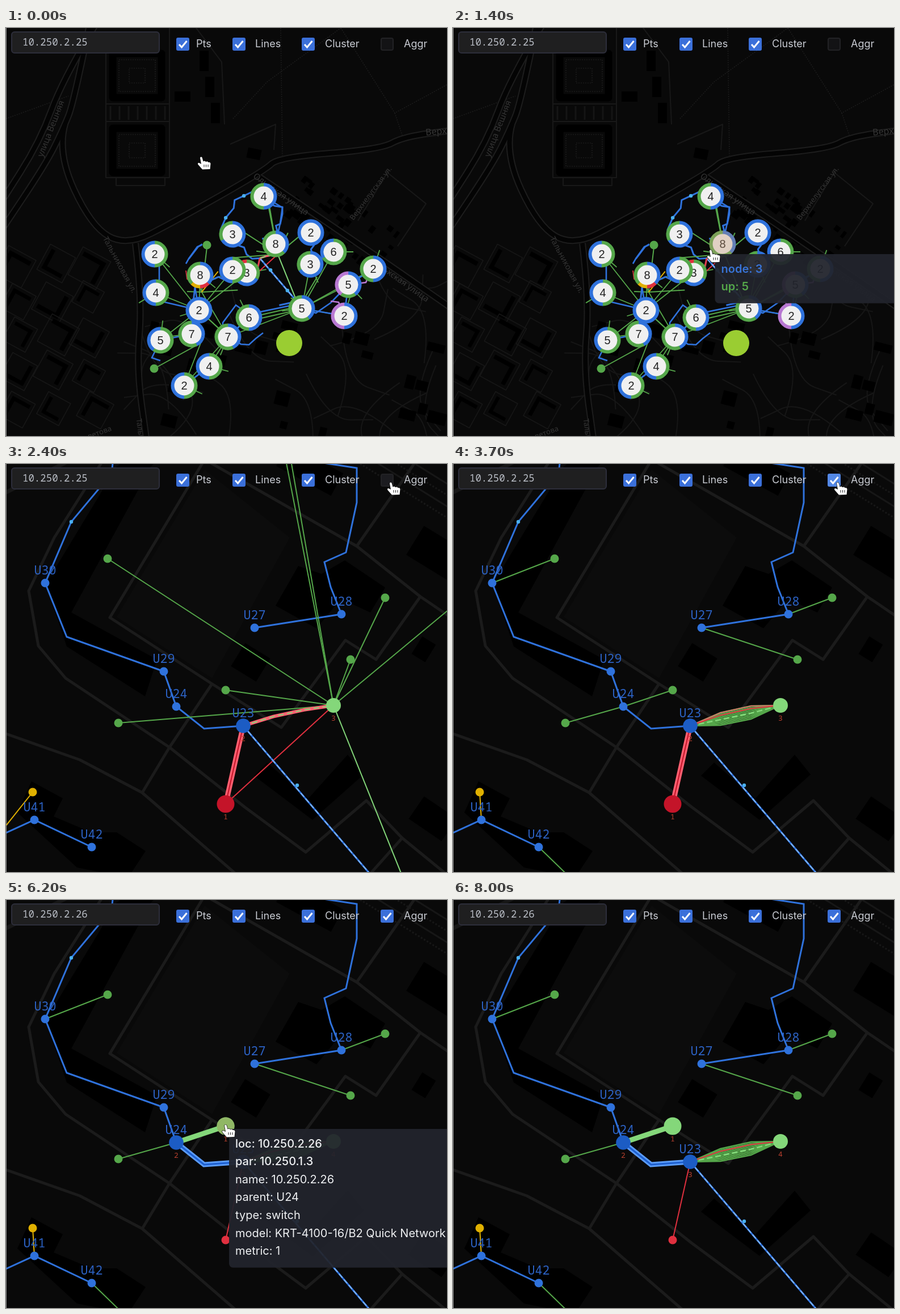
An HTML page with a canvas for the animation above (8.6 s loop, 777 by 720 pixels).

```html
<!DOCTYPE html>
<html lang="en">
<head>
<meta charset="utf-8">
<title>Network map</title>
<style>
html,body{margin:0;width:100%;height:100%;overflow:hidden;background:#090909}
canvas{display:block}
</style>
</head>
<body>
<canvas id="stage" width="777" height="720"></canvas>
<script>
const g = document.getElementById('stage').getContext('2d');
const LOOP = 8600, CX = 454.5, CY = 392.5, FULL = 5.04;
const SANS = 'Inter, "Open Sans", sans-serif';
const MONO = '"Noto Sans Mono", "DejaVu Sans Mono", monospace';
const INK = {b: '#2f72dc', g: '#55a74a', r: '#e0303f', y: '#e0b000', p: '#b878d2', l: '#84d77a'};

const pts = s => s.split(' ').map(p => p.split(',').map(Number));
const at = s => (x, y) => [CX + (x - CX) * s, CY + (y - CY) * s];
function trace(list, close) {
  g.beginPath();
  list.forEach(([x, y]) => g.lineTo(x, y));
  if (close) g.closePath();
}
// Rounds every inner corner of a polyline.
function curve(list) {
  g.beginPath(); g.moveTo(...list[0]);
  for (let i = 1; i < list.length - 1; i++) {
    const [x, y] = list[i], [u, v] = list[i + 1];
    g.quadraticCurveTo(x, y, (x + u) / 2, (y + v) / 2);
  }
  g.lineTo(...list.at(-1));
}
function stroke(list, color, width, dash = [], shape = trace) {
  shape(list);
  g.strokeStyle = color; g.lineWidth = width;
  g.setLineDash(dash); g.stroke(); g.setLineDash([]);
}
function disc(x, y, r, color) {
  g.beginPath(); g.arc(x, y, r, 0, 7); g.fillStyle = color; g.fill();
}
function text(s, x, y, font, color, align = 'left') {
  g.font = font; g.fillStyle = color; g.textAlign = align; g.fillText(s, x, y);
}
function box(x, y, w, h, r, fill, edge) {
  g.beginPath(); g.roundRect(x, y, w, h, r);
  g.fillStyle = fill; g.fill();
  if (edge) { g.strokeStyle = edge; g.lineWidth = 2; g.stroke(); }
}
function placed(x, y, turn, draw) {
  g.save(); g.translate(x, y); g.rotate(turn); draw(); g.restore();
}
function block(x, y, w, h, turn) {
  placed(x, y, turn, () => { g.fillStyle = '#000'; g.fillRect(-w / 2, -h / 2, w, h); });
}
function randomizer(seed) {
  return () => (seed = (seed * 16807) % 2147483647) / 2147483647;
}

// ---- base maps ----
const AVENUES = [
  '150,-20 120,130 100,180 70,240 -10,360', '166,-20 100,90 60,200 -10,310',
  '104,170 90,220 150,350 212,385 300,340 455,252 480,228 660,214 700,192 790,180',
  '228,380 240,480 230,600 248,730', '445,262 600,366 790,498'
].map(pts);
const LANES = ['176,36 176,264 288,264 288,0', '176,134 288,134', '176,165 288,165', '194,264 194,278 280,278 280,264',
  '335,0 380,60 385,170', '395,205 475,170 472,215', '675,250 620,340', '668,252 740,310 690,385'].map(pts);
const TRAILS = ['484,0 487,225', '400,160 460,95 590,0', '590,0 685,150 777,100', '685,150 700,195', '0,160 110,120'].map(pts);
const STREETS = [
  ['улица Вешняя', 80, 178, -1.2, 15], ['Тальниковая ул.', 200, 418, 1.08, 14], ['Верх', 758, 184, -.1, 16],
  ['Верхнелугская ул.', 643, 292, -.93, 13], ['Ольхская улица', 484, 294, .62, 15],
  ['Ольхская улица', 696, 447, .62, 15], ['Тальн', 236, 708, 1.45, 13], ['ветова', 165, 714, -.35, 13]
];
function courtyard(x, y, size, turn) {
  placed(x, y, turn, () => {
    const a = size, b = size * .38;
    const ell = [[-a, -a], [a, -a], [a, -a + b], [-a + b, -a + b], [-a + b, a], [-a, a]];
    trace(ell, true); g.fillStyle = '#000'; g.fill();
    g.strokeStyle = '#171717'; g.lineWidth = 1.5; g.strokeRect(-a - 6, -a - 6, 2 * a + 12, 2 * a + 12);
  });
}
function cityMap() {
  const rnd = randomizer(41), span = (a, b) => a + rnd() * (b - a);
  g.lineJoin = 'round';
  LANES.forEach(l => stroke(l, '#181818', 2));
  TRAILS.forEach(l => stroke(l, '#1c1c1c', 1.5, [2, 2]));
  for (let i = 0; i < 26; i++) {
    const x = span(240, 760), y = span(470, 720), a = span(0, 6);
    const leg = (d, turn) => [x + d * Math.cos(a + turn), y + d * Math.sin(a + turn)];
    stroke([leg(90, 0), [x, y], leg(80, 2)], '#161616', 2, [], curve);
  }
  for (let y = 420; y < 730; y += 62)
    for (let x = 20; x < 215; x += 66) courtyard(x + span(-8, 8), y + span(-8, 8), span(15, 22), .5 + 1.57 * Math.floor(span(0, 4)));
  for (let i = 0; i < 50; i++) {
    const u = span(0, 200), v = span(-75, 55);
    block(515 + u * .8 + v * .3, 285 + u * .55 - v * .6, span(6, 16), span(6, 13), .65);
  }
  for (let i = 0; i < 26; i++) block(span(250, 770), span(510, 720), span(12, 38), span(10, 26), .25);
  for (let i = 0; i < 3; i++) block(349 + i * 10, 58 + i * 46, 16, 36, 0);
  block(311, 121, 28, 18, 0); block(437, 222, 24, 18, .2);
  for (const y of [84, 216]) {
    g.strokeStyle = '#000'; g.lineWidth = 13; g.strokeRect(188, y - 39, 86, 78);
    g.setLineDash([2, 2]); g.strokeStyle = '#222'; g.lineWidth = 1.2;
    g.strokeRect(199, y - 28, 64, 56); g.strokeRect(217, y - 13, 28, 26); g.setLineDash([]);
  }
  for (let x = 184; x < 285; x += 16) stroke([[x, 138], [x, 162]], '#151515', 3);
  AVENUES.forEach(l => stroke(l, '#1d1d1d', 12, [], curve));
  AVENUES.forEach(l => stroke(l, '#040404', 8, [], curve));
  for (const [s, x, y, a, size] of STREETS)
    placed(x, y, a, () => text(s, 0, 4, size + 'px "Noto Sans", sans-serif', '#353535', 'center'));
}
const HALLS = ['70,212 195,5 330,-110 350,-90 255,5 115,262 266,345 245,410 107,322',
  '475,250 515,180 556,194 597,170 668,218 642,262 590,238 547,290', '437,550 460,527 533,590 602,513 630,548 540,628',
  '45,560 100,590 84,622 150,650 195,650 246,683 215,730 125,712 20,615'].map(pts);
const PATHS = ['-220,410 0,476 130,522 240,580 470,780', '240,580 288,500 363,388', '350,-8 183,271 363,388 485,465 598,311 652,345 730,234',
  '288,500 105,378 57,321 40,224 85,130 170,-5 320,-140', '288,500 420,605 528,685 635,594 698,660 820,760', '698,660 600,770',
  '350,-8 618,145 730,234 930,370', '618,145 705,20 760,-60'].map(pts);
function yardMap() {
  g.lineJoin = 'round';
  g.fillStyle = '#0c0c0c'; trace(pts('350,10 195,270 363,378 500,130'), true); g.fill();
  HALLS.forEach(h => { trace(h, true); g.fillStyle = '#000'; g.fill(); });
  block(431, 350, 52, 48, .55); block(757, 157, 85, 60, .55); block(736, 327, 28, 36, .55);
  block(752, 626, 70, 48, .6); block(535, 10, 110, 45, .5); block(-95, 350, 90, 75, .4);
  PATHS.forEach(p => stroke(p, '#1b1b1b', 5));
  for (let i = 0; i < 4; i++) {
    stroke([[-220, 160 - 60 * i], [350, -125 - 60 * i]], '#171717', 7);
    stroke([[400, -200 + 20 * i], [930, 130 + 20 * i]], '#171717', 3, i % 2 ? [3, 3] : []);
  }
}

// ---- network ----
// "name:x,y" marks a labelled node on its cable.
const NODES = {};
const CABLES = [
  'U27:438,289 U28:591,265 572,217 561,173 599,156 618,68 618,7 552,-3 U33:464,-42 U32:380,-143 276,-93 194,-55 186,17 115,102 U30:69,210 107,305 U29:278,366 U24:300,428 349,467 U23:418,462',
  'U34:839,192 880,226 U35:904,276 898,348 872,383 888,433', 'U25:864,563 927,521',
  '-176,873 U17:-158,723 U41:50,628 U42:151,676', 'U40:-93,337 -131,360 -212,466', 'U21:746,846 590,880'
].map(line => line.split(' ').map(token => {
  const [place, name] = token.split(':').reverse(), p = place.split(',').map(Number);
  if (name) NODES[name] = p;
  return p;
}));
const U = NODES, HUB = [577, 426], HUB2 = [-99, 763], RED = [387, 600], LEAF = [387, 399];
const BEND = [349, 467];
const LEAVES = `179,167,U30 198,457,U24 387,399,U24 607,345,U27 668,236,U28 471,-120,U32 492,-64,U33
-50,346,U40 -174,553,U17 222,745,U42 47,579,U41`.split(/\s/).map(s => {
  const [x, y, name] = s.split(',');
  return {p: [+x, +y], parent: U[name], hub: x < 100 || y > 700 ? HUB2 : HUB, ink: name == 'U41' ? INK.y : INK.g};
});
LEAVES[0].hub = LEAVES[1].hub = HUB;
LEAVES.slice(0, 7).forEach(l => l.hub = HUB);

const CLUSTERS = `454,297,bbgg 399,364,bbg 475,381,bbbggggg 537,361,bb 577,395,ggggbb 536,417,bbg 647,425,bg
603,453,bbgpp 596,508,bp 424,432,gbr 399,427,gb 342,436,bbbryggg 262,399,gb 264,467,ggbb 340,498,bb 428,511,bbbggg
521,495,bbggg 391,545,bbbgggg 327,540,bbbgggg 272,551,gggbb 358,597,ggbb 314,631,gb`.split(/\s/).map(s => {
  const [x, y, kinds] = s.split(',');
  return {x: +x, y: +y, kinds};
});
const LOOPS = ['345,383 337,386 322,407 317,416', '391,545 414,558 428,559 440,548 453,538', '382,530 382,520 405,489 428,505 520,486',
  '521,495 546,503 572,485 603,453', '272,551 257,582 272,587', '454,297 487,317 483,345 475,381',
  '270,410 270,452 272,482 340,498 333,458'].map(pts);
const HUBS = CLUSTERS.filter(c => [340, 391, 521].includes(c.x));
const gap = (a, b) => Math.hypot(a.x - b.x, a.y - b.y);
const nearest = (c, list) => list.filter(o => o != c).sort((a, b) => gap(a, c) - gap(b, c))[0];

function farLinks(W) {
  const rnd = randomizer(9);
  const draw = (l, color, w) => stroke(l.map(p => W(...p)), color, w);
  const wire = (a, b, color, w) => draw([[a.x, a.y], [b.x, b.y]], color, w);
  for (const c of CLUSTERS) {
    if (c.y < 390) continue;
    wire(c, nearest(c, HUBS), INK.g, 1.8);
    if (c.y > 500 || c.x > 500) wire(c, nearest(c, CLUSTERS), INK.b, 2.6);
    const a = rnd() * 6.3;
    wire(c, {x: c.x + 35 * Math.cos(a), y: c.y + 35 * Math.sin(a)}, INK.g, 1.8);
  }
  for (const dy of [0, 6]) draw([[428, 511 + dy], [521, 490 + dy]], INK.g, 1.8);
  draw(pts('261,601 343,556 314,631'), INK.g, 1.8);
  draw(pts('343,463 391,545'), INK.g, 1.8);
  draw(pts('319,465 345,466'), INK.g, 1.8);
  LOOPS.forEach(l => draw(l, INK.b, 2.6));
  draw(pts('317,428 319,443 334,451 333,458'), INK.r, 1.8);
  draw(pts('572,482 586,484 596,508'), INK.p, 2.6);
  draw(pts('603,453 634,449 638,440'), INK.p, 2.6);
}
function drawCluster(c, P, hot) {
  const [x, y] = P(c.x, c.y), step = Math.PI * 2 / c.kinds.length;
  disc(x, y, 18.5, '#f0f0f0');
  [...c.kinds].forEach((k, i) => {
    const a = i * step - Math.PI / 2;
    g.beginPath(); g.arc(x, y, 20.5, a, a + step + .01);
    g.strokeStyle = INK[k]; g.lineWidth = 6; g.stroke();
  });
  text(c.kinds.length, x, y + 7, '20px "Liberation Sans", sans-serif', '#222', 'center');
  if (hot) disc(x, y, 23.5, 'rgba(195,150,115,.36)');
}
function network(k, t, aggr, moved, hover) {
  const s = k / FULL, N = at(s), W = at(k), clustered = k < 2;
  const draw = (l, color, width, dash) => stroke(l.map(p => N(...p)), color, width, dash);
  const dot = (p, r, color) => disc(...N(...p), r, color);
  const font = 21.6 * s + 'px ' + MONO;
  const note = (str, [x, y], dy, f, color) => text(str, ...N(x, y + dy), f, color, 'center');

  if (clustered) farLinks(W);
  CABLES.forEach(l => draw(l, INK.b, 3));
  LEAVES.forEach(l => draw([l.p, aggr ? l.parent : l.hub], l.ink, 2));
  if (!aggr) {
    draw([RED, HUB], INK.r, 2);
    draw([HUB, U.U21], INK.l, 2);
    draw([HUB, [798, 242]], INK.g, 2);
    draw([[693, 815], U.U21], INK.g, 2);
    draw([[927, 628], [782, 873]], INK.g, 2);
  }
  draw([U.U23, U.U21], INK.b, 3.2);
  draw([U.U23, U.U21], '#7db4ff', 2, [9, 4]);

  const strand = (a, color, w, dash) =>
    draw([U.U23, [471, 439 + 22 * a], [525, 427 + 23 * a], HUB], color, w, dash);
  if (aggr) {
    for (let i = 0; i < 9; i++) strand(i / 8, INK.g, 2.4);
    if (!moved) strand(0, '#d07a68', 2);
    strand(.55, INK.l, 2.5, [10, 5]);
    strand(.2, INK.r, 2);
  } else {
    strand(.3, '#ff6272', clustered ? 3 : 6);
    strand(.3, INK.l, 2, [10, 6]);
  }
  if (moved) {
    const route = [U.U24, BEND, U.U23];
    draw([U.U23, RED], INK.r, 2);
    draw([LEAF, U.U24], INK.l, 9);
    draw(route, '#5a9bf8', 9); draw(route, '#1d5fd0', 3);
  } else {
    draw([U.U23, RED], '#ff5f70', clustered ? 3 : k < 4 ? 7 : 9);
    draw([U.U23, RED], '#c41429', clustered ? 1 : 2);
  }
  for (const p of [[115, 102], [276, -93], [513, 567], [663, 749]]) dot(p, 3.2, '#4ab0f0');

  if (clustered) {
    disc(...W(354, 383), 7.5, INK.g);
    disc(...W(261, 601), 7.5, INK.g);
    disc(...W(499, 556), 23, '#9acd32');
    CLUSTERS.forEach(c => drawCluster(c, W, c === hover));
    return;
  }
  LEAVES.forEach(l => dot(l.p, 7.5, l.ink));
  if (!aggr) [HUB2, [798, 242], [693, 815]].forEach(p => dot(p, 7.5, INK.g));
  for (const n in U) dot(U[n], 7.5, n == 'U24' && k < 5 ? '#5b74b0' : INK.b);
  const trail = moved ? [LEAF, U.U24, U.U23, HUB] : [RED, U.U23, HUB];
  dot(HUB, 13, INK.l);
  trail.slice(1, -1).forEach(p => dot(p, 12.8, '#1c5cc4'));
  if (moved) { dot(RED, 7.5, INK.r); dot(LEAF, 15.5, INK.l); }
  else dot(RED, 15.5, '#c41429');
  if (t >= 5900 && t < 6700) dot(LEAF, moved ? 15.5 : 7.5, '#90b765');
  trail.forEach((p, i) => note(i + 1, p, 26.5, 13 * s + 'px ' + MONO, '#b8402f'));
  for (const n in U) note(n, U[n], -15.5, font, '#2c62c4');
}

// ---- interface ----
function tooltip(x, y, rows) {
  box(x, y, 420, rows.length * 31.6 + 23.5, 7, 'rgba(33,36,44,.94)');
  rows.forEach(([s, color, weight], i) =>
    text(s, x + 11, y + 32.5 + i * 31.6, `${weight} 20px ${SANS}`, color));
}
const DETAILS = ['loc: 10.250.2.26', 'par: 10.250.1.3', 'name: 10.250.2.26', 'parent: U24', 'type: switch',
  'model: KRT-4100-16/B2 Quick Network', 'metric: 1'].map((s, i) => [s, '#eef0f2', i < 2 ? 500 : 400]);
function summary(kinds) {
  const count = c => kinds.split(c).length - 1;
  return [['node', 'b', '#3874d8'], ['up', 'g', INK.g], ['down', 'r', INK.r]]
    .filter(r => count(r[1])).map(([name, c, color]) => [`${name}: ${count(c)}`, color, 600]);
}
function toolbar(aggr, moved, x, y) {
  const over = x < 270 && y > 5 && y < 45, hot = x > 658 && x < 690 && y < 45;
  box(10, 7, 260, 37, 5, '#1f1f20', over ? '#444658' : '#2d2e3b');
  text(moved ? '10.250.2.26' : '10.250.2.25', 29, 30.5, '17.4px ' + MONO, '#b9bdc5');
  [[300, 335, 'Pts'], [399, 439, 'Lines'], [521, 562, 'Cluster'], [660, 701, 'Aggr']].forEach(([bx, tx, name], i) => {
    const lit = i == 3 && hot;
    if (i < 3 || aggr) {
      box(bx, 17, 23, 23, 3, lit ? '#5388e6' : '#3b70da');
      stroke([[bx + 5, 29], [bx + 9.5, 34], [bx + 18.5, 23]], '#fff', 3);
    } else box(bx + 1, 18, 21, 21, 3, lit ? '#1c1c20' : '#131315', '#222225');
    text(name, tx, 33.5, '18px ' + SANS, '#c9ccd3');
  });
}
const hand = new Path2D('M5 2Q6.5 -.5 8.5 1.5L10.5 8.5 13 7.5 15 9 18 8.5 19.5 10 22 10 23.5 12 22.5 22 9 22.5 1.5 14Q0 11 3 11L7 13Z');
function pointer(x, y) {
  placed(x, y, 0, () => {
    g.lineWidth = 1.4; g.strokeStyle = '#111'; g.stroke(hand);
    g.fillStyle = '#fff'; g.fill(hand);
    for (const bar of [12, 15.5, 19]) stroke([[bar, 14], [bar, 18.5]], '#222', 1);
  });
}

// ---- timeline ----
// time, x, y, and whether the pointer glides on to the next stop
const STOPS = [[0, 337, 227, 1], [700, 422, 452, 1], [900, 414, 430, 1], [1400, 447, 391], [2400, 671, 32],
  [5300, 590, 144], [5600, 400, 413], [5900, 380, 399], [6200, 380, 396], [6700, 380, 398], [6900, 347, 410],
  [7200, 410, 423], [7400, 410, 423, 1], [8000, 150, -30]];
function pointerAt(t) {
  const i = STOPS.findLastIndex(s => s[0] <= t), [t0, x, y, glide] = STOPS[i];
  if (!glide) return [x, y];
  const [t1, u, v] = STOPS[i + 1], p = (t - t0) / (t1 - t0);
  return [x + (u - x) * p, y + (v - y) * p];
}
function zoomAt(t) {
  const p = Math.max(0, Math.min(1, (t - 1600) / 800));
  return Math.pow(FULL, 1 - Math.pow(1 - p, 2.09));
}
function scaled(s, draw) {
  g.save(); g.translate(CX, CY); g.scale(s, s); g.translate(-CX, -CY);
  draw(); g.restore();
}
function render(time) {
  const t = Math.floor((time % LOOP) / 100) * 100;
  const k = zoomAt(t), [px, py] = pointerAt(t);
  const aggr = t >= 3700 && t < 4700 || t >= 5200, moved = t >= 6200;
  const hover = t < 2400 ? CLUSTERS.findLast(c => gap(c, {x: px + 8, y: py + 1}) < 23.5) : null;
  g.fillStyle = '#090909'; g.fillRect(0, 0, 777, 720);
  if (k < 2) scaled(k, cityMap); else scaled(k / FULL, yardMap);
  network(k, t, aggr, moved, hover);
  toolbar(aggr, moved, px + 8, py);
  if (hover) tooltip(px + 14.5, py + 8, summary(hover.kinds));
  else if (t >= 5900 && t < 7200) tooltip(393, t < 6200 ? 406 : t < 6700 ? 404 : 405, DETAILS);
  pointer(px, py);
  g.fillStyle = '#8a8a8a'; g.fillRect(0, 0, 1, 720);
}
const start = performance.now();
(function tick() {
  render(performance.now() - start);
  requestAnimationFrame(tick);
})();
</script>
</body>
</html>
```
